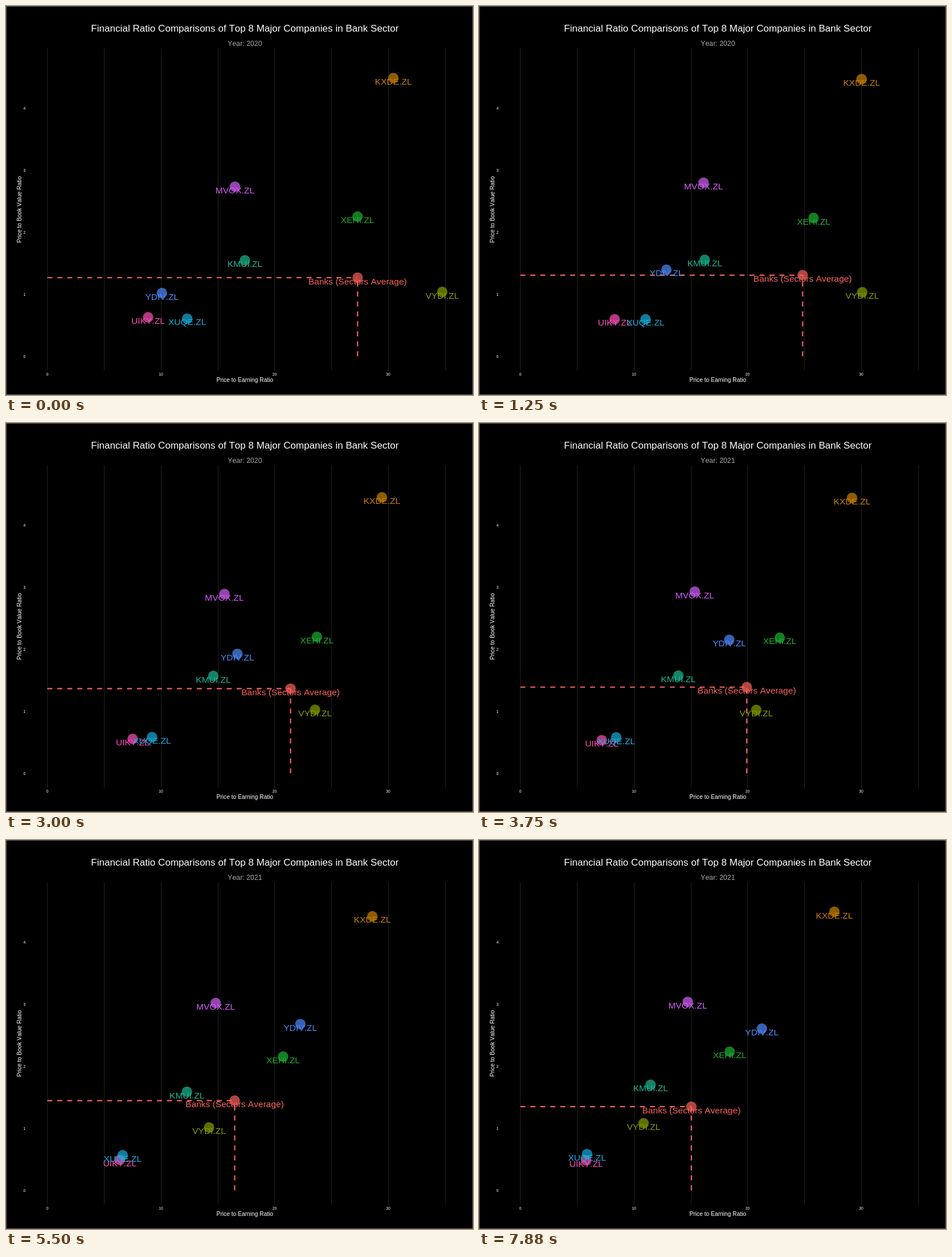
Write an HTML page with a canvas that moves like this. It is 820 px wide and 683 px high and loops after 8000 ms.

```html
<!DOCTYPE html>
<html lang="en">
<head>
<meta charset="utf-8">
<title>Financial ratios</title>
<style>
html, body { margin: 0; width: 100%; height: 100%; overflow: hidden; background: #000; }
canvas { display: block; }
</style>
</head>
<body>
<canvas id="stage" width="820" height="683"></canvas>
<script>
const ctx = document.getElementById('stage').getContext('2d');
const LEFT = 72.6, BASE = 615, CENTER = 419.4;
const STEPS = 64, TURN = 50, YEAR_STEP = 25;

// name, colour, then x, y at the first step, at the turn and at the last step
const marks = [
  ['Banks (Sectors Average)', '#f9635c', 617.3, 477, 372.1, 454.9, 372.9, 468.2],
  ['KXDE.ZL', '#ca8100', 680.2, 126.5, 638.2, 135, 624, 126],
  ['VYDI.ZL', '#869d00', 766, 502, 300.7, 505.1, 289, 497.3],
  ['XEHI.ZL', '#1cb031', 617.2, 369.7, 468.7, 381.8, 440.2, 371.8],
  ['KMUI.ZL', '#1cb992', 419.5, 446.5, 303.8, 441.4, 301.3, 429.8],
  ['UIKY.ZL', '#ff4eb8', 249.4, 546.5, 193, 563.8, 188.2, 562.6],
  ['XUQE.ZL', '#18aede', 318.2, 548.9, 189.4, 554.2, 189.7, 551.4],
  ['YDIV.ZL', '#4e8cff', 273.8, 504, 550, 298.6, 496.7, 331.3],
  ['MVOX.ZL', '#d45ffa', 401.9, 317.3, 363.5, 282, 366.5, 284.2]
];

function label(str, x, y, size, color = '#fff') {
  ctx.font = `${size}px "Liberation Sans", Arial, sans-serif`;
  ctx.fillStyle = color;
  ctx.fillText(str, x, y);
}

function line(x1, y1, x2, y2) {
  ctx.beginPath();
  ctx.moveTo(x1, y1);
  ctx.lineTo(x2, y2);
  ctx.stroke();
}

function place([name, color, x0, y0, x1, y1, x2, y2], step) {
  const mix = (a, b, c) => step < TURN
    ? a + (b - a) * step / TURN
    : b + (c - b) * (step - TURN) / (STEPS - 1 - TURN);
  return { name, color, x: mix(x0, x1, x2), y: mix(y0, y1, y2) };
}

function drawChart(year) {
  ctx.fillStyle = '#000';
  ctx.fillRect(0, 0, 820, 683);
  ctx.lineWidth = 1;
  ctx.strokeStyle = '#6a6a6a';
  ctx.strokeRect(0.5, 0.5, 819, 682);

  ctx.strokeStyle = '#222';
  for (let i = 0; i < 8; i++) {
    const x = Math.floor(LEFT + i * 99.81) + 0.5;
    line(x, 74, x, 640);
  }
  for (let i = 0; i < 4; i++) label(i * 10, LEFT + i * 199.5, 649.3, 6.83);
  for (let i = 0; i < 5; i++) label(i, 32.5, 617.5 - i * 109, 6.83);

  label('Financial Ratio Comparisons of Top 8 Major Companies in Bank Sector', CENTER, 44.6, 17.08);
  label('Year: ' + year, CENTER, 70.4, 12.3, '#a8a8a8');
  label('Price to Earning Ratio', CENTER, 660, 10.25);
  ctx.save();
  ctx.translate(26.8, 357.3);
  ctx.rotate(-Math.PI / 2);
  label('Price to Book Value Ratio', 0, 0, 10.25);
  ctx.restore();
}

function draw(step) {
  drawChart(step < YEAR_STEP ? 2020 : 2021);
  const points = marks.map(m => place(m, step));
  const mean = points[0];

  ctx.strokeStyle = mean.color;
  ctx.lineWidth = 2.19;
  ctx.setLineDash([8.75, 8.75]);
  line(LEFT, mean.y, mean.x, mean.y);
  line(mean.x, BASE, mean.x, mean.y);
  ctx.setLineDash([]);

  ctx.globalAlpha = 0.7;
  for (const p of points) {
    ctx.fillStyle = p.color;
    ctx.beginPath();
    ctx.arc(p.x, p.y, 9.25, 0, Math.PI * 2);
    ctx.fill();
  }
  ctx.globalAlpha = 1;
  for (const p of points) label(p.name, p.x, p.y + 11.5, 15.55, p.color);
}

// Steps last 130 and 120 ms in turn.
function tick() {
  const t = performance.now() % 8000;
  draw(Math.floor(t / 250) * 2 + (t % 250 >= 130 ? 1 : 0));
  requestAnimationFrame(tick);
}

ctx.textAlign = 'center';
ctx.fontKerning = 'none';
tick();
</script>
</body>
</html>
```
